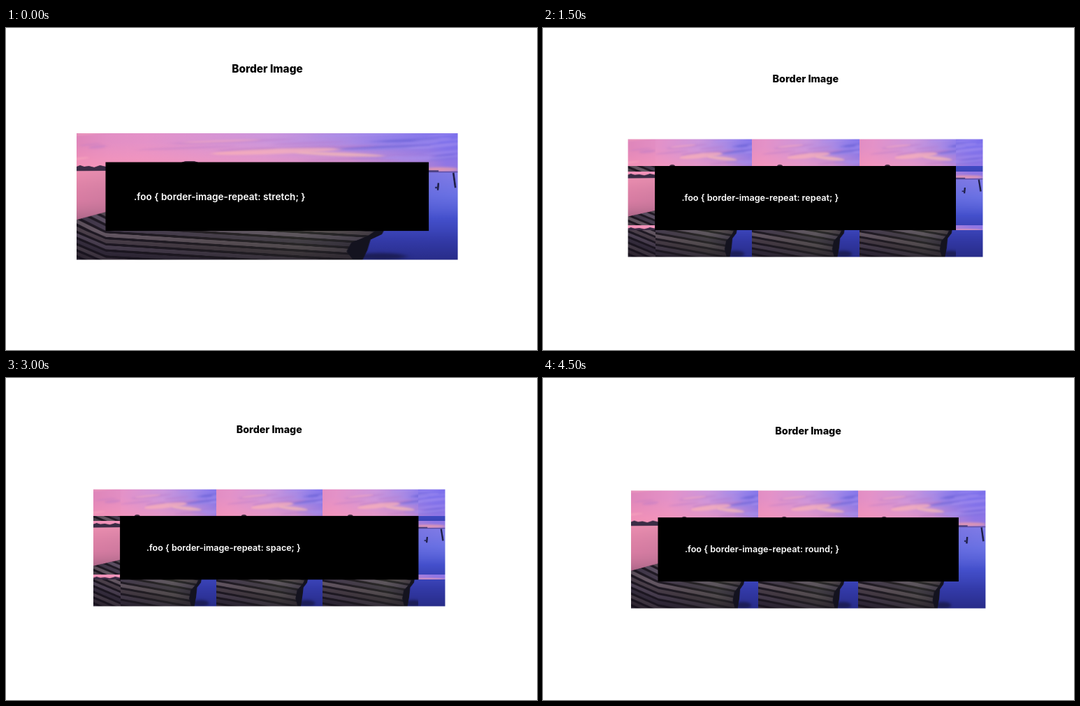
An HTML page with a canvas for the animation above (6 s loop, 760 by 462 pixels).

```html
<!DOCTYPE html>
<html lang="en">
<head>
<meta charset="utf-8">
<title>Border Image</title>
<style>
html, body { margin: 0; width: 100%; height: 100%; overflow: hidden; background: #fff; }
.scene {
  position: absolute; left: 0; top: 0; width: 760px; height: 462px;
  visibility: hidden; font-family: Inter, "Open Sans", sans-serif;
  animation: show 6s step-end infinite;
}
@keyframes show {
  0% { visibility: visible; }
  25%, 100% { visibility: hidden; }
}
.scene canvas { position: absolute; left: 0; top: 0; }
.scene h1, .scene p { position: absolute; margin: 0; line-height: 20px; white-space: pre; }
.scene h1 { font-weight: 800; color: #000; transform: translateX(-50%); }
.scene p { font-weight: 600; color: #fff; }
</style>
</head>
<body>
<script>
// Picture is 600 x 400, sliced 100 from each side.
const W = 600, H = 400, S = 100;

// box: left, top, right, bottom; title and code: x, middle, font size
const scenes = [
  { mode: 'stretch', box: [101, 151, 646.6, 332.6], border: 41.5, title: [374, 58.5, 15.4], code: [183, 242, 13.6] },
  { mode: 'repeat', box: [121.6, 159.5, 629.5, 328.5], border: 38.5, title: [375.8, 73, 14.35], code: [198.5, 244, 12.65] },
  { mode: 'space', box: [125, 159.8, 628.5, 327.4], border: 38.1, title: [376.8, 74, 14.25], code: [201, 243.5, 12.55] },
  { mode: 'round', box: [126, 161.6, 633.4, 330.4], border: 38.5, title: [379.6, 75.5, 14.35], code: [203, 245.5, 12.65] }
];

function makeCanvas(w, h) {
  const c = document.createElement('canvas');
  c.width = w;
  c.height = h;
  return c;
}

function paintPicture() {
  const c = makeCanvas(W, H), g = c.getContext('2d');
  let seed = 7;
  const random = () => (seed = seed * 16807 % 2147483647) / 2147483647;

  const gradient = (x0, y0, x1, y1, colors) => {
    const f = g.createLinearGradient(x0, y0, x1, y1);
    colors.forEach((color, i) => f.addColorStop(i / (colors.length - 1), color));
    return f;
  };
  const rect = (x, y, w, h, fill) => { g.fillStyle = fill; g.fillRect(x, y, w, h); };
  const poly = (fill, ...p) => {
    g.fillStyle = fill;
    g.beginPath();
    for (let i = 0; i < p.length; i += 2) g.lineTo(p[i], p[i + 1]);
    g.fill();
  };
  const blob = (x, y, rx, ry, fill, tilt = 0) => {
    g.fillStyle = fill;
    g.beginPath();
    g.ellipse(x, y, rx, ry, tilt, 0, 7);
    g.fill();
  };

  // sky
  rect(0, 0, W, 132, gradient(0, 0, W, 50, ['#df86ba', '#e492c8', '#cc96dc', '#9a84e8', '#7d70e8']));
  rect(0, 30, W, 102, gradient(0, 30, 0, 120, ['#ff98b400', '#ff98b4aa']));
  rect(400, 0, 200, 132, gradient(400, 0, 560, 0, ['#7c70ee00', '#7c70eebb']));
  g.filter = 'blur(3px)';
  for (let i = 0; i < 30; i++) {
    const x = random() * W, y = random() * 95;
    const tone = x > 400 ? ['#a892f077', '#6a62d477'] : ['#ffb4c288', '#b678c866'];
    blob(x, y, 30 + random() * 50, 2 + random() * 4, tone[i % 2], -0.1);
  }
  blob(310, 62, 80, 9, '#ffb8b499', -0.1);
  blob(390, 72, 55, 6, '#ffc3b099', 0.1);
  blob(545, 120, 55, 6, '#ffa6a0aa');
  g.filter = 'none';

  // water
  rect(0, 126, W, 274, gradient(0, 0, W, 0, ['#dc7da6', '#c9789f', '#6a58b4', '#5a5ed4', '#6a70e4']));
  rect(380, 126, 220, 274, gradient(0, 126, 0, 400, ['#9486ea88', '#6a72e4aa', '#4450cc', '#333aa8', '#282c88']));
  rect(0, 126, 140, 170, gradient(0, 126, 0, 290, ['#f79cb888', '#d07c9c55', '#80506ecc']));

  // far shore
  poly('#3a2b44', 0, 112, 12, 108, 26, 112, 42, 110, 60, 114, 80, 108, 100, 112, 130, 110, 130, 124, 0, 125);
  blob(204, 100, 10, 5, '#3a2438');
  rect(500, 126, 100, 3, '#5a489a');
  rect(500, 123, 34, 4, '#433a78');

  // mooring posts
  g.strokeStyle = '#1c1c42';
  g.lineWidth = 6;
  g.beginPath();
  g.moveTo(533, 160); g.lineTo(531, 181);
  g.moveTo(584, 130); g.lineTo(591, 174);
  g.stroke();
  rect(522, 171, 10, 5, '#28285a');

  // jetty
  g.filter = 'blur(5px)';
  blob(440, 388, 32, 12, '#1c1e58');
  g.filter = 'none';
  poly('#14131f', 0, 268, 100, 245, 300, 262, 446, 292, 442, 312, 428, 330, 424, 366, 418, 400, 0, 400);
  g.save();
  g.beginPath();
  [[0, 268], [100, 245], [300, 262], [436, 296], [424, 318], [404, 340], [398, 370], [406, 400], [0, 400]]
    .forEach(([x, y]) => g.lineTo(x, y));
  g.clip();
  rect(0, 240, 450, 160, '#1b1620');
  const wood = ['#62556a', '#483e52', '#70626e', '#584b56'];
  for (let i = 0; i < 13; i++) {
    const y = 140 + i * 21;
    poly(wood[i % 4], 0, y, 100, y + 42, 450, y + 104, 450, y + 117, 100, y + 55, 0, y + 12);
  }
  rect(0, 240, 450, 160, gradient(0, 0, 450, 0, ['#1a141e44', '#3a303a22', '#50503a33', '#64704a44', '#18182466']));
  rect(0, 300, 450, 100, gradient(0, 300, 0, 400, ['#15101c00', '#15101c99']));
  g.restore();
  return c;
}

// Tile [start, end] pairs along one border edge.
function tiles(mode, a, b, size) {
  if (mode === 'stretch') return [[a, b]];
  const len = b - a;
  let start = a, step = size;
  if (mode === 'round') {
    step = len / Math.max(1, Math.round(len / size));
  } else {
    start = (a + b - size) / 2;
    while (start > a) start -= size;
  }
  const list = [];
  for (let t = start; t < b - 1; t += step) list.push([Math.round(t), Math.round(t + step)]);
  return list;
}

// Bands along one axis: [start, end, picture start, picture length]
function bands(a, b, border, total) {
  const p = Math.ceil(a + border), q = Math.floor(b - border);
  return [[Math.floor(a), p, 0, S], [p, q, S, total - 2 * S], [q, Math.ceil(b), total - S, S]];
}

function drawBorder(g, pic, { mode, box: [l, t, r, b], border }) {
  const unit = border / S;
  const cut = (x, y, w, h) => {
    g.save();
    g.beginPath();
    g.rect(x, y, w, h);
    g.clip();
  };
  g.imageSmoothingQuality = 'high';
  cut(l, t, r - l, b - t);
  bands(l, r, border, W).forEach(([x0, x1, sx, sw], i) =>
    bands(t, b, border, H).forEach(([y0, y1, sy, sh], j) => {
      if (i === 1 && j === 1) return;
      const xs = i === 1 ? tiles(mode, x0, x1, sw * unit) : [[x0, x1]];
      const ys = j === 1 ? tiles(mode, y0, y1, sh * unit) : [[y0, y1]];
      cut(x0, y0, x1 - x0, y1 - y0);
      for (const [p, q] of xs)
        for (const [u, v] of ys) g.drawImage(pic, sx, sy, sw, sh, p, u, q - p, v - u);
      g.restore();
    }));
  g.restore();
  g.fillStyle = '#000';
  g.fillRect(l + border, t + border, r - l - 2 * border, b - t - 2 * border);
}

function addText(parent, tag, text, [x, mid, size]) {
  const el = document.createElement(tag);
  el.textContent = text;
  el.style.cssText = `left:${x}px;top:${mid - 10}px;font-size:${size}px`;
  parent.append(el);
}

const picture = paintPicture();
scenes.forEach((scene, i) => {
  const el = document.createElement('div');
  el.className = 'scene';
  el.style.animationDelay = `${i ? i * 1.5 - 6 : 0}s`;
  const canvas = makeCanvas(760, 462);
  drawBorder(canvas.getContext('2d'), picture, scene);
  el.append(canvas);
  addText(el, 'h1', 'Border Image', scene.title);
  addText(el, 'p', `.foo { border-image-repeat: ${scene.mode}; }`, scene.code);
  document.body.append(el);
});
</script>
</body>
</html>
```
